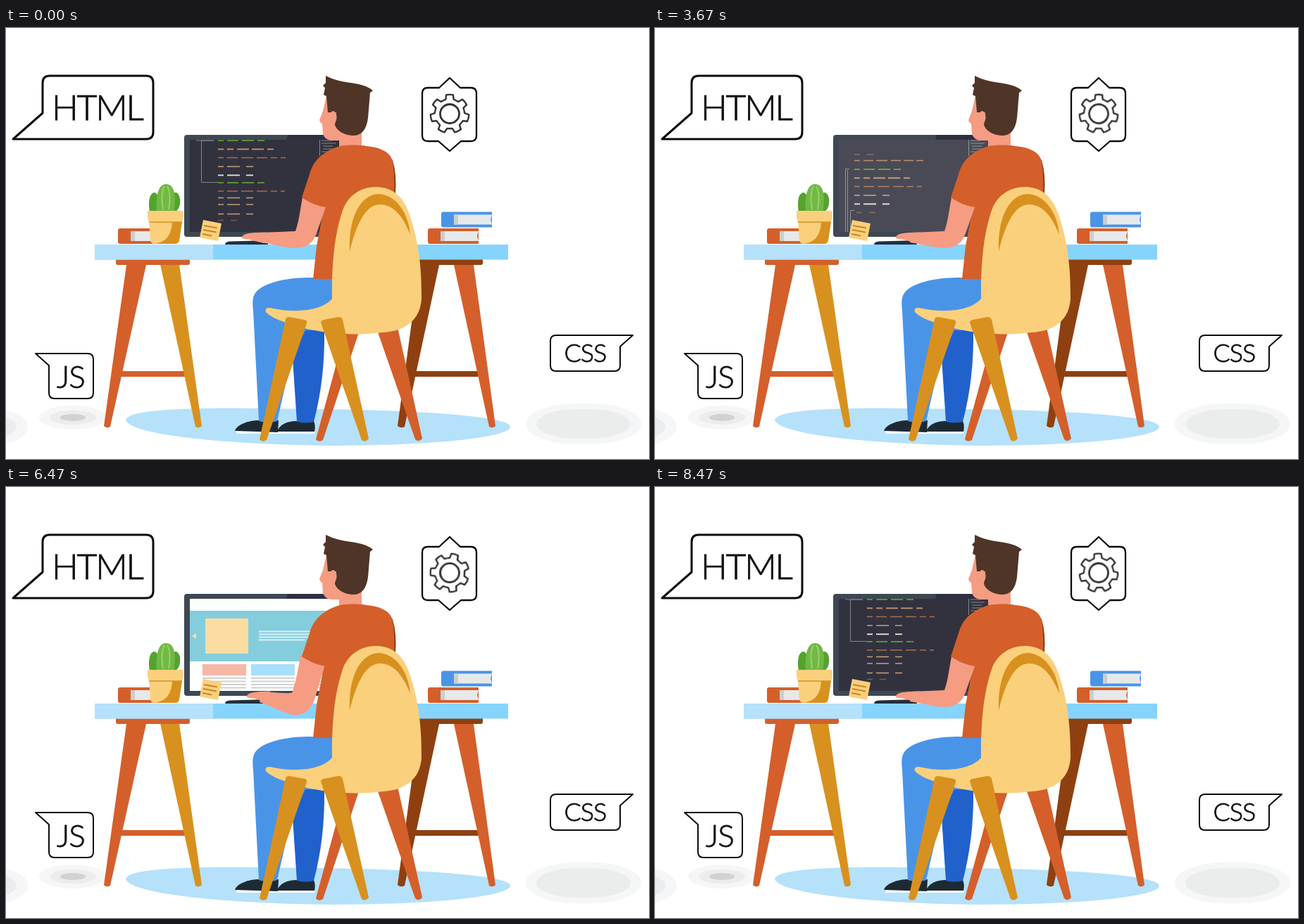
Animation, 913 px wide and 613 px high, one loop 8540 ms. Source, as an HTML page without scripts:

```html
<!DOCTYPE html>
<html lang="en">
<head>
<meta charset="utf-8">
<title>Developer at work</title>
<style>
html, body { margin: 0; width: 100%; height: 100%; overflow: hidden; background: #fff; }
svg { display: block; width: 913px; height: 613px; }
.a { animation: 8540ms linear infinite; }
.ink { fill: none; stroke: #0c0c0c; stroke-linejoin: round; }
.or { fill: #d45f2b; } .dk { fill: #8f4011; } .gd { fill: #d8911f; } .ye { fill: #fbd07c; }
.sk { fill: #f59c83; } .bl { fill: #4a94e8; } .sky { fill: #b5e1fa; }
.label { font-family: Lato, "Open Sans", sans-serif; font-weight: 300; fill: #111; stroke: #111; stroke-width: .8; }

/* code lines */
.code path { fill: none; stroke-width: 1.7; }
.code .g { stroke: #67b32e; stroke-dasharray: 8 5 16 5 17 5 10 99; }
.code .t { stroke: #c59a72; stroke-dasharray: 8 5 9 5 17 4 17 5 9 99; }
.code .o { stroke: #ad6d4c; stroke-dasharray: 8 5 15 5 17 5 15 5 9 5 8 99; }
.code .s { stroke: #c9a077; stroke-dasharray: 8 5 18 9 10 99; }
.code .w { stroke: #f1ece6; stroke-dasharray: 8 5 18 9 10 99; }
.code .d { stroke: #7d5a4c; stroke-dasharray: 8 10 9 99; }
.code .x { stroke: #b98259; stroke-dasharray: 8 5 14 4 16 5 14 4 14 4 10 99; }
.code .k { stroke: #85868c; stroke-width: 1; }

.scroll { animation-name: scroll; }
@keyframes scroll {
  0%, 77.01%, 100% { transform: translateY(-124px); }
  41.9%, 77% { transform: translateY(39px); }
}
.veil { animation-name: veil; }
@keyframes veil {
  0%, 41.7%, 97.2%, 100% { opacity: 0; }
  49.8%, 65.6% { opacity: .76; }
  70.3%, 90.7% { opacity: 1; }
}
.load { animation-name: load; }
@keyframes load { 0%, 47%, 73.5%, 100% { opacity: 0; } 49.8%, 70.3% { opacity: 1; } }
.fill { transform-origin: 311px 0; animation-name: fill; }
@keyframes fill { 0%, 50% { transform: scaleX(0); } 61.7%, 100% { transform: scaleX(1); } }
.pulse { animation: pulse 375ms ease-in-out -15ms infinite alternate; }
@keyframes pulse { from { opacity: .5; } to { opacity: 1; } }
.site { animation-name: site; }
@keyframes site { 0%, 72%, 97.2%, 100% { opacity: 0; } 77.3%, 90.7% { opacity: 1; } }

.gear { transform-origin: 630px 122px; animation-name: spin; }
@keyframes spin { to { transform: rotate(360deg); } }

/* arm, sleeve, hand and mug */
.arm { animation-name: arm; }
@keyframes arm {
  0%, 21%, 41%, 70%, 81.5%, 83%, 91.5%, 100% { d: path("M421 241C417 262 416 275 411 289C396 290 380 290 364 291L362 305C382 308 398 313 413 313C429 312 436 305 441 292L455 252Z"); }
  26%, 36.5%, 76%, 87% { d: path("M418 240C414 262 412 275 406 293C394 294 380 292 362 291L360 306C380 312 395 324 412 325C428 324 436 312 440 296L453 252Z"); }
  31%, 32.5% { d: path("M416 236C409 255 403 270 399 284C385 286 372 281 358 282L356 300C375 303 390 309 405 309C420 308 428 298 432 288L446 250Z"); }
}
.sleeve { animation-name: sleeve; }
@keyframes sleeve {
  0%, 21%, 41%, 100% { d: path("M474 168C448 176 436 190 431 208L420 241C430 248 442 253 454 255L480 200Z"); }
  31%, 32.5% { d: path("M474 168C448 176 437 188 430 205L414 237C424 246 435 250 446 253L480 200Z"); }
}
.shift { animation-name: shift; }
@keyframes shift {
  0%, 21%, 41%, 100% { transform: none; }
  31%, 32.5% { transform: translate(-4px, -4px); }
}
.type { animation-name: type; }
@keyframes type {
  0%, 6%, 11.5%, 17.2%, 23%, 29%, 32%, 34%, 40%, 46%, 94%, 100% { transform: none; }
  3%, 9%, 14.4%, 20%, 26%, 37%, 43%, 50%, 92%, 96%, 99.2% { transform: translateX(7px); }
}
.mug { animation-name: mug; animation-timing-function: ease-in-out; }
@keyframes mug {
  0%, 27%, 39.5%, 100% { transform: translate(62px, 40px); }
  31.8%, 34.5% { transform: none; }
}
</style>
</head>
<body>
<svg viewBox="0 0 913 613" xmlns="http://www.w3.org/2000/svg">
  <defs>
    <clipPath id="screen"><path d="M261 159H473V290H261Z"/></clipPath>
    <path id="tooth" d="M-9.1-18.9L-5.600-20.500L-4.900-26.800Q0-28 4.900-26.800L5.600-20.500L9.100-18.900"/>
    <g id="block" class="code">
      <path class="g" d="M0 0H70"/><path class="t" d="M0 12.300H80"/><path class="o" d="M0 24.500H96"/>
      <path class="s" d="M0 37H52"/><path class="w" d="M0 49.300H52"/>
    </g>
    <g id="book">
      <path d="M3 0H72V22H3Q0 22 0 19V3Q0 0 3 0Z"/>
      <path fill="#e6e9ea" d="M18 4H72L70 11L72 18H18Z"/>
      <path fill="#c9cfd1" d="M18 4H24V18H18Z"/>
    </g>
    <g id="card">
      <path d="M0 252H62V268H0Z"/>
      <path stroke="#bdbdbd" stroke-width="2" d="M0 272H62M0 276.500H62M0 281H62M0 285.500H62"/>
    </g>
  </defs>

  <!-- floor -->
  <ellipse cx="-20" cy="567" rx="51" ry="26" fill="#f5f6f7"/>
  <ellipse cx="-20" cy="567" rx="35" ry="16" fill="#eaeced"/>
  <ellipse cx="95" cy="554" rx="48" ry="17" fill="#f6f6f6"/>
  <ellipse cx="95" cy="554" rx="33" ry="10" fill="#ececec"/>
  <ellipse cx="95" cy="554" rx="18" ry="5" fill="#d2d2d0"/>
  <rect x="738" y="534" width="164" height="58" rx="70" ry="29" fill="#f5f6f7"/>
  <rect x="753" y="542" width="134" height="42" rx="58" ry="21" fill="#ebeded"/>
  <path class="sky" d="M170 558C172 536 330 541 443 542C600 544 716 553 716 567C716 583 600 594 462 594C300 592 178 578 170 558Z"/>

  <!-- desk legs -->
  <path class="or" d="M162 488H256V496H162Z"/>
  <path class="gd" d="M219 336H246L278 566Q274 570 269 567Z"/>
  <path class="or" d="M156 329H261V334Q261 337 258 337H199L148 567Q143 570 139 566L171 337H159Q156 337 156 334Z"/>
  <path class="dk" d="M578 488H672V496H578ZM580 329H677V334Q677 337 674 337H615L566 567Q561 570 556 566L587 337Z"/>
  <path class="or" d="M636 337H664L695 566Q691 570 686 567Z"/>

  <!-- monitor -->
  <rect x="253" y="152" width="230" height="145" rx="4" fill="#3d4853"/>
  <path fill="#2e2f41" d="M400 152H478V159H398Z"/>
  <g clip-path="url(#screen)">
    <path fill="#32323f" d="M261 159H490V290H261Z"/>
    <g class="code">
      <g class="a scroll">
        <path class="d" d="M283 141H312"/><path class="x" d="M283 149.500H382"/>
        <use href="#block" x="283" y="162"/>
        <path class="d" d="M286 223.500H314"/><path class="d" d="M301 262H330"/><path class="x" d="M301 272H400"/>
        <use href="#block" x="301" y="284"/>
        <path class="g" d="M301 344H370"/><path class="o" d="M301 356H396"/>
        <path class="s" d="M301 365.500H352"/><path class="s" d="M301 375H352"/><path class="s" d="M301 388.500H352"/>
        <path class="d" d="M301 397.500H330"/>
        <path class="k" d="M283 220.500H277.500V262.500H299M276 161.500H270.500V284H295M273.500 163V262M295 284H277.500V343.500H301"/>
      </g>
      <path class="k" d="M445.500 159V182M448 160H462M448 164H468M450 168H464M450 172H470M448 176H462"/>
    </g>
    <path class="a veil" fill="#fff" d="M261 159H490V290H261Z"/>
    <g class="a load">
      <text class="pulse" x="315.500" y="217" font-size="11.5" font-family="Roboto, sans-serif" fill="#111">CREATING WEBSITE...</text>
      <path fill="#d9dcd9" stroke="#20d818" stroke-width="3" d="M309.500 225.500H452.500V233.500H309.500Z"/>
      <path class="a fill" fill="#263128" d="M311 226.500H451V232.500H311Z"/>
    </g>
    <g class="a site">
      <path fill="#fff" d="M261 159H490V290H261Z"/>
      <path fill="#52bacf" d="M261 176H490V248H261Z"/>
      <path class="ye" d="M283 187H344V237H283ZM270 208V216L264 212Z"/>
      <path stroke="#c8edf6" stroke-width="1.800" d="M359 205.500H455M359 209.500H455M359 213.500H455M359 217.500H425"/>
      <use href="#card" x="279" fill="#f39b83"/>
      <use href="#card" x="348" fill="#84d3fd"/>
      <use href="#card" x="417" fill="#f39b83"/>
    </g>
  </g>
  <path class="ye" d="M280 273L306 278L301 303L275 298Z"/>
  <path stroke="#c98528" stroke-width="2" d="M281 281L300 284.500M280 287L299 290.500M279 293L292 295.500"/>

  <!-- things on the desk -->
  <use href="#book" class="or" x="159" y="285"/>
  <use href="#book" class="or" x="599" y="285"/>
  <use href="#book" class="bl" x="618" y="261.500"/>
  <path fill="#55a32f" d="M204 262C202 248 203 236 210 234C217 234 217 246 218 262ZM233 262C231 250 234 235 240 234C247 234 248 245 247 250C246 258 242 260 240 262Z"/>
  <path fill="#71b845" d="M214 262C212 240 216 222 227 222C240 222 242 240 238 262Z"/>
  <path fill="none" stroke="#9ad06c" stroke-width="2" d="M223 258C220 240 222 230 225 225M231 258C234 240 232 230 229 225"/>
  <path class="ye" d="M203 274H250L246 302Q245 307 240 307H211Q206 307 205 302Z"/>
  <path class="gd" d="M236 276H250L246 302Q245 307 240 307H208C226 306 235 296 236 276Z"/>
  <path class="ye" d="M201 260H251Q253 268 250 276H203Q200 270 201 260Z"/>
  <path fill="none" stroke="#d8911f" stroke-width="1.500" d="M203 276H250"/>
  <path fill="#85d4fe" d="M126 308H713V329.500H126Z"/>
  <path class="sky" d="M126 308H294V329.500H126Z"/>
  <path fill="#22303f" d="M311 308Q311 304 318 303.500L372 302V308Z"/>

  <g class="a mug">
    <path class="sk" d="M408 224L422 210L440 236L418 242Z"/>
    <path fill="#f6f6f6" d="M391 181Q392 178 396 179L421 183Q425 184 424 187L418 219Q417 224 412 223L391 219Q386 218 387 213Z"/>
    <path fill="#cfcfcf" d="M419 183Q425 184 424 187L418 219Q417 223 412 223Z"/>
    <path fill="#e3e3e3" d="M388 194L392 192L391 197Z"/>
  </g>

  <!-- legs and shoes -->
  <path fill="#fff" d="M326 572H438V577H328Z"/>
  <path fill="#1e2a33" d="M325 573C328 564 344 558 360 558H387L386 575ZM385 574C388 564 400 559 412 559H437Q440 566 438 574Z"/>
  <path fill="#2161cc" d="M420 420L407 470L413 560Q425 563 437 560Q453 500 452 430Z"/>
  <path class="bl" d="M466 357C430 353 385 354 360 371C349 379 350 388 351 402L359 559Q372 563 385 559L405 472L425 430H470Z"/>
  <path class="or" d="M482 430H502L450 586Q444 590 440 585ZM527 430L555 421L591 584Q586 590 581 585Z"/>

  <!-- upper body -->
  <path class="sk" d="M473 145H505V172H473Z"/>
  <path class="dk" d="M545 184L549 188Q555 208 553 236H546Z"/>
  <path class="or" d="M474 168C485 166 502 166 512 168C534 170 547 178 549 190Q552 210 551 240V357H436L441 310L450 262L455 200Z"/>
  <path class="sk a arm" d="M421 241C417 262 416 275 411 289C396 290 380 290 364 291L362 305C382 308 398 313 413 313C429 312 436 305 441 292L455 252Z"/>
  <g class="a shift"><path class="sk a type" d="M368 290.500C358 291 350 291 345 292C338 293 334 296 335 299Q339 300.500 345 300.500C352 303 360 305 368 306Z"/></g>
  <path class="or a sleeve" d="M474 168C448 176 436 190 431 208L420 241C430 248 442 253 454 255L480 200Z"/>

  <!-- head -->
  <path class="sk" d="M455 96L450 118L445 131Q446 135 449 136L450 150Q452 159 462 160H480L500 145L480 96Z"/>
  <path fill="#4f3527" d="M454 68L463 72C482 79 502 77 517 86L521 89L517 92L514 128C512 144 505 153 494 153C482 153 470 147 467 138L469 120H457L455 97L451 95L453 85L450 82L454 78Z"/>
  <ellipse class="sk" cx="464.500" cy="127" rx="5" ry="9"/>

  <!-- chair -->
  <path class="ye" d="M463 385C462 330 468 285 480 254C490 234 508 226 526 226C550 227 565 240 574 268C584 300 590 330 590 385C588 415 568 431 535 433C500 438 455 435 420 426C395 419 376 412 369 404Q367 397 375 398C400 404 445 406 463 385Z"/>
  <path class="gd" d="M488 318C486 270 503 236 530 236C556 238 572 266 574 294C564 268 550 251 531 251C512 251 498 276 488 318Z"/>
  <path class="gd" d="M397 414Q398 411 402 411L424 415Q428 416 427 420L370 586Q364 590 360 585ZM447 419Q447 416 451 415L472 411Q477 411 478 415L515 584Q510 590 505 586Z"/>

  <!-- bubbles -->
  <path class="ink" stroke-width="3" d="M62 68H199Q209 68 209 78V148Q209 158 199 158H10L52 121V78Q52 68 62 68Z"/>
  <text class="label" x="65" y="131" font-size="50" letter-spacing="-2.2">HTML</text>
  <path class="ink" stroke-width="2" d="M42 463H116Q124 463 124 471V519Q124 527 116 527H69Q61 527 61 519V480Z"/>
  <text class="label" x="72" y="511.500" font-size="44" letter-spacing="-1">JS</text>
  <path class="ink" stroke-width="2" d="M781 437H890L872 453V480Q872 488 864 488H781Q773 488 773 480V445Q773 437 781 437Z"/>
  <text class="label" x="792.500" y="475" font-size="36" letter-spacing="-1">CSS</text>
  <path class="ink" stroke-width="2.300" d="M630 71L645 85H660Q668 85 668 93V153Q668 161 660 161H646L630 175L614 161H599Q591 161 591 153V93Q591 85 599 85H615Z"/>
  <g class="a gear">
    <g class="ink" transform="translate(630 122)" style="stroke:#333" stroke-width="2.400">
      <use href="#tooth"/>
      <use href="#tooth" transform="rotate(51.430)"/>
      <use href="#tooth" transform="rotate(102.860)"/>
      <use href="#tooth" transform="rotate(154.290)"/>
      <use href="#tooth" transform="rotate(205.710)"/>
      <use href="#tooth" transform="rotate(257.140)"/>
      <use href="#tooth" transform="rotate(308.570)"/>
      <circle r="13.500" stroke-width="2.800"/>
    </g>
  </g>
</svg>
</body>
</html>
```
